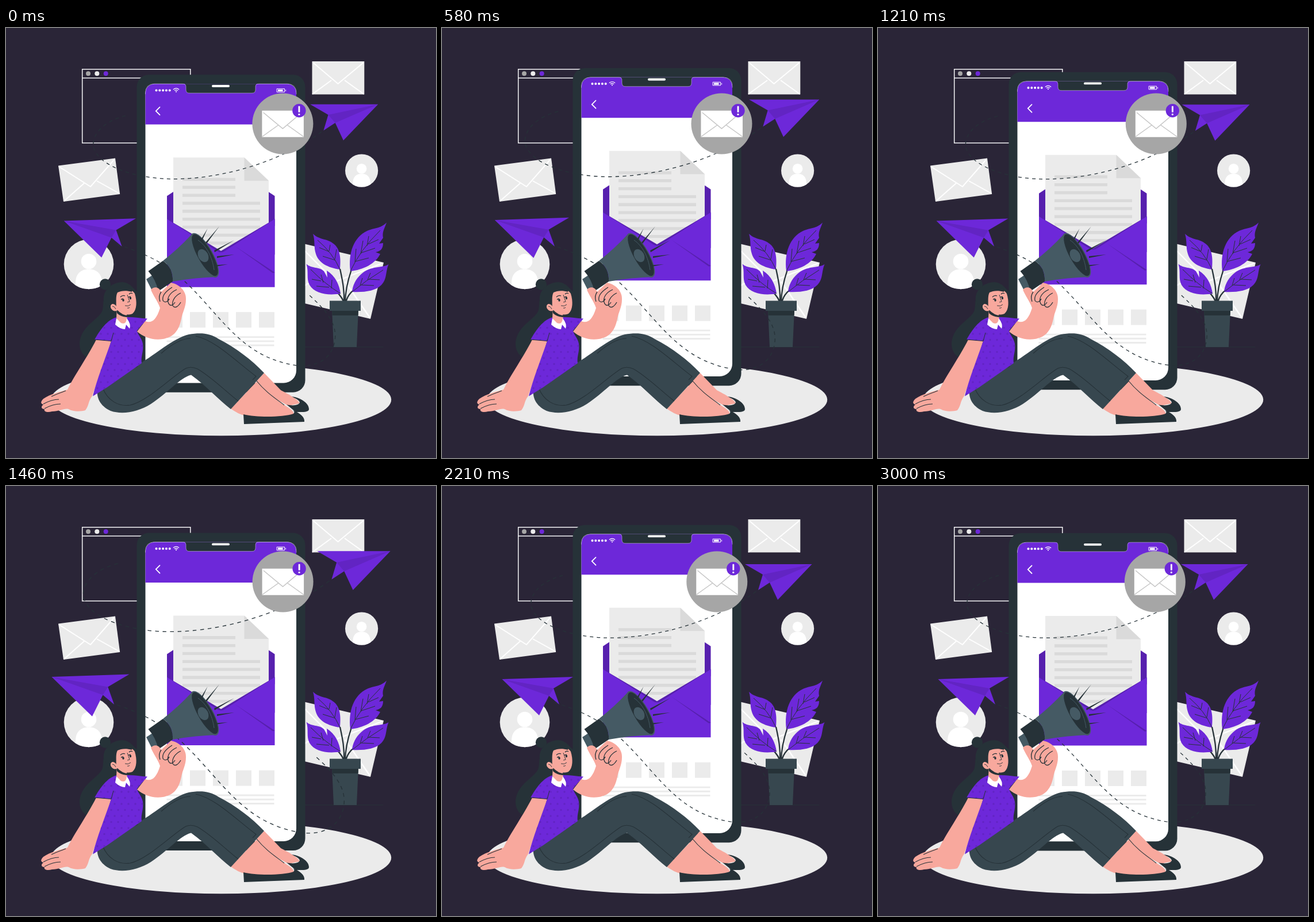
Recreate the animation shown at these times as an HTML page with a canvas. Size 748 by 748 pixels, loop 3.04 s.

```html
<!DOCTYPE html>
<html lang="en">
<head>
<meta charset="utf-8">
<title>Mail notifications</title>
<style>
html, body { margin: 0; width: 100%; height: 100%; overflow: hidden; background: #2a2537; }
canvas { display: block; width: 748px; height: 748px; }
</style>
</head>
<body>
<canvas id="stage" width="748" height="748"></canvas>
<script>
const ctx = document.getElementById('stage').getContext('2d');
const BG = '#2a2537', INK = '#263238', SLATE = '#37474f', STEEL = '#455a64';
const PURPLE = '#6d28d9', MID = '#6224c3', DEEP = '#5720ae', PALE = '#ebebeb', GREY = '#a6a6a6';
const SKIN = '#f8a89d', WHITE = '#fff';
const LOOP = 3040, CYCLE = 3000, FRAMES = 73, STEP = 1000 / 24, PX = 748 / 500;

const paths = new Map();
function path(d) {
  if (!paths.has(d)) paths.set(d, new Path2D(d));
  return paths.get(d);
}
function fill(color, d) { ctx.fillStyle = color; ctx.fill(path(d)); }
function line(color, width, d) {
  ctx.strokeStyle = color;
  ctx.lineWidth = width;
  ctx.stroke(path(d));
}
function rect(color, x, y, w, h, r = 0) {
  ctx.fillStyle = color;
  ctx.beginPath();
  ctx.roundRect(x, y, w, h, r);
  ctx.fill();
}
function oval(color, x, y, rx, ry = rx, turn = 0) {
  ctx.fillStyle = color;
  ctx.beginPath();
  ctx.ellipse(x, y, rx, ry, turn, 0, Math.PI * 2);
  ctx.fill();
}
function group(draw) { ctx.save(); draw(); ctx.restore(); }

// Linear keyframes: [[position, value], ...]
function track(keys, p) {
  const i = Math.max(1, keys.findIndex(k => k[0] >= p));
  const [a, u] = keys[i - 1], [b, v] = keys[i];
  return u + (v - u) * (p - a) / (b - a);
}
const FLOAT = [[0, 0], [.5, -10], [1, 0]];
const SHAKE = [[0, 0], [.1, -1], [.2, 2], [.3, -4], [.4, 4], [.5, -4], [.6, 4], [.7, -4], [.8, 2], [.9, -1], [1, 0]];
const BEAT = [[0, 1], [.1, 1.1], [.3, 1], [.4, 1], [.5, 1.1], [.6, 1], [1, 1]];

function browser() {
  line('#f4f4f6', 1.5, 'M132.7 71.8H320.8V200H132.7ZM132.7 87H320.8');
  oval(GREY, 143, 79.3, 4);
  oval(PALE, 158.3, 79.3, 4);
  oval(PURPLE, 173.7, 79.3, 4);
}
function avatar(x, y, s) {
  group(() => {
    ctx.translate(x, y);
    ctx.scale(s, s);
    oval(PALE, 0, 0, 43.3);
    ctx.clip();
    oval(WHITE, 0, -5, 13.3);
    fill(WHITE, 'M-23 50V32C-23 17-14 8.500 0 8.500S23 17 23 32V50Z');
  });
}
function letters() {
  rect(PALE, 532.5, 58, 90.8, 57.6);
  line(WHITE, 2, 'M534 60L577.500 97 622 60M533 115L566 91M589 91L622.500 115');
  fill(PALE, 'M91 239.500L190 226.500 198.200 289 100 302Z');
  line(WHITE, 2, 'M92 241L147 276 189 228M101 301L136 270M158 266L197.500 288');
  fill(PALE, 'M504 372L657 408 634 506 481 470Z');
  line(WHITE, 2.4, 'M506 374L573 441 655 409M483 469L549 431M590 441L633 504');
}

function phone(dy) {
  ctx.translate(0, dy);
  rect(INK, 227.5, 82, 293, 552.5, 21);
  group(() => {
    ctx.beginPath();
    ctx.roundRect(242.5, 98, 262.5, 520.3, [16, 16, 22, 22]);
    ctx.clip();
    rect(WHITE, 242, 97, 264, 522);
    rect(PURPLE, 242, 97, 264, 71.5);
    fill(INK, 'M306 97C312 97 313 99 313 104V108Q313 114 319 114H428Q434 114 434 108V104C434 99 435 97 441 97Z');
  });
  line('rgba(255,255,255,.5)', .8, 'M242.500 116V114Q242.500 98 258.500 98H306C312 98 313 100 313 104V108Q313 114 319 114H428Q434 114 434 108V104C434 100 435 98 441 98H489Q505 98 505 114V116');
  rect(WHITE, 358, 99.9, 31, 3.8, 1.9);
  for (let i = 0; i < 5; i++) oval(WHITE, 261.5 + i * 5.8, 109.3, 2);
  ctx.lineCap = 'round';
  line(WHITE, 1.2, 'M291.300 107.600Q296 104 300.700 107.600M293.300 109.700Q296 107.700 298.700 109.700');
  oval(WHITE, 296, 111.6, 1.1);
  line(WHITE, 1, 'M471.500 106.500H484.500V112.200H471.500ZM486.500 108.500V110.500');
  rect(WHITE, 473, 107.8, 8.5, 3.2);
  line(WHITE, 1.8, 'M267.500 138.500L260.800 145.200 267.500 152');
  ctx.lineCap = 'butt';

  fill(DEEP, 'M280 293L374 231 467.500 293V395H280Z');
  const sheet = 'M291 226H414.500L457 266.500V341L374 391 291 341Z';
  fill(PALE, sheet);
  group(() => {
    ctx.clip(path(sheet));
    for (let i = 0; i < 9; i++) rect('#dadada', 307, 261.5 + i * 13.85, i < 3 ? 92 : 135, 5.3);
  });
  fill('#dadada', 'M414.500 226L457 266.500H414.500Z');
  fill(DEEP, 'M280 333L374 388.500 467.500 333V345L374 398 280 345Z');
  fill(PURPLE, 'M280 333L366 388Q374 394 382 388L467.500 333V451.500H280Z');
  fill(DEEP, 'M398 380L467.500 426 464 427ZM350 380L280 426 283 427Z');
  for (let i = 0; i < 5; i++) rect(PALE, 280 + i * 40, 495, 27, 27);
  for (let i = 0; i < 3; i++) rect(PALE, 279.5, 537 + i * 7.2, 187, 2.9);
}

function plant() {
  line(INK, 1, 'M520 555H656');
  line(INK, 2.3, 'M588 478C589 455 585 438 581 419M590 478C590 455 596 435 601 420M588 478C584 467 578 460 565 452M591 478C594 464 602 456 619 446');
  fill(PURPLE, 'M599 423C595 391 605 364 628 353C641 347 650 350 662 338.500C658 350 654 355 656 365L649 375 656 374C656 385 651 388 643 390L651 393C643 410 621 421 599 423Z');
  fill(PURPLE, 'M534 358C546 370 560 365 573 378C583 389 582 406 581 420C560 417 544 409 539 393C535 381 538 370 534 358Z');
  fill(PURPLE, 'M522.500 410.500C532 419 545 415 553 423L559 434 558 422C573 431 580 447 582 462C560 466 537 462 528 447C522 436 527 424 522.500 410.500Z');
  fill(PURPLE, 'M665.500 411C655 418 634 413 618 428C608 437 603 448 602 459C622 460 642 458 653 447C663 437 660 424 665.500 411Z');
  line(INK, 1, 'M599 423Q616 386 651 352M607 407L609 384M617 393L621 370M628 379L631 362M608 406L631 400M618 391L642 383M630 376L648 368');
  line(INK, 1, 'M581 420Q568 391 542 369M572 402L575 385M562 388L564 377M573 404L551 397M562 389L545 382');
  line(INK, 1, 'M582 462Q557 447 530 420M566 453L567 438M552 443L548 429M562 451L540 449M548 440L532 437');
  line(INK, 1, 'M602 459Q626 439 656 421M616 448L620 435M629 438L634 426M618 447L640 448M631 437L650 438');
  fill(SLATE, 'M567 490H613L610 555H570Z');
  fill(INK, 'M567 491H613L612.500 500H567.500Z');
  rect(SLATE, 563, 474.5, 54, 17.5);
}

function flight(s) {
  ctx.translate(374, 380);
  ctx.scale(s, s);
  ctx.translate(-374, -380);
  ctx.setLineDash([6, 6]);
  line(INK, 1.25, 'M556 176C528 198 508 209 480 222C410 254 336 266 281 264C229 262 164 244 155 209C152 185 177 163 213 155');
  line(INK, 1.25, 'M197 377C270 400 300 425 342 471C390 524 425 572 502 584C538 589 568 572 570 535C571 508 550 486 526 464');
  ctx.setLineDash([]);
  fill(PURPLE, 'M527 136H643.500L584 198 570 168 550 181 558 154Z');
  fill(MID, 'M558 154L643.500 136 570 168Z');
  fill(PURPLE, 'M104.500 336L228 332 194 352 204 380 186 365 169 399Z');
  fill(MID, 'M104.500 336L194 352 186 365Z');
}

function badge(dx) {
  ctx.translate(dx, 0);
  oval(GREY, 481.8, 166.5, 53);
  rect(WHITE, 445.8, 143.7, 72.5, 46);
  line('#c4c4c4', 1.4, 'M448 147L481.800 175 515 147M446 189L474 169M490 169L518 189');
  oval(PURPLE, 510.3, 143.8, 11.7);
  rect(WHITE, 508.9, 135.8, 2.9, 11, 1);
  oval(WHITE, 510.3, 150.3, 1.6);
}

function legs() {
  fill(SKIN, 'M449 600L436 614C448 632 473 649 492 657L511 653C508 645 487 635 478 630Z');
  fill(INK, 'M497 641C512 643 527 652 527 663C527 669 514 668 504 668L488 655C500 658 510 656 511 651C509 646 502 644 497 641Z');
  fill(SKIN, 'M438 613L391 662C400 669 408 672 414 674C440 679 480 680 501 672C500 664 490 660 483 655C468 644 451 628 438 613Z');
  line(INK, 1.1, 'M436 614C452 634 470 645 484 656');
  fill(INK, 'M413 672C437 678 482 677 500 671C502 669 502 667 499 665C512 670 520 677 519 685L414 689Z');
  fill(SLATE, 'M234 583C260 568 290 540 318 533C337 530 354 530 370 541C400 556 428 578 449 600L391 663C370 647 348 622 322 603.500C303 608 280 636 252 654C230 668 202 673 182 666C163 657 157 643 159 626Z');
  line(INK, 1.1, 'M168 626C177 648 195 659 216 656C246 650 291 604 313 592Q322 588 333 593C356 606 380 630 404 649');
  line(INK, 1.1, 'M330 536C364 543 399 579 435 606L429 612M216 597C222 588 230 592 229 586M270 566C287 551 306 540 321 540');
}
function torso() {
  fill(SKIN, 'M157 542C142 572 119 604 107 629C96 632 76 637 65 645C59 651 61 654 65 655C59 660 63 663 67 663C65 668 73 669 80 667C93 667 101 661 109 663C117 668 131 667 138 665C145 656 142 651 150 640C159 613 176 572 183 544Z');
  line(INK, 1.1, 'M65 654C76 648 84 646 92 646M67 662C78 656 86 654 95 654M104 631C96 634 87 637 79 641');
  const shirt = 'M193 503C176 507 163 526 154 542L183 544.500C172 577 158 611 151 640.500L176 625 236 583C234 571 240 563 238 549C236 539 230 535 228 527L246 505.500C235 505 224 503 214 503Z';
  fill(PURPLE, shirt);
  group(() => {
    ctx.clip(path(shirt));
    for (let r = 0; r < 14; r++)
      for (let c = 0; c < 10; c++) oval(MID, 153 + c * 12 + r % 2 * 6, 511 + r * 10.5, 1.7);
  });
  line(INK, 1, 'M154 542L183 544.500 187 530M228 527L238 515');
}
function head() {
  fill(INK, 'M183 452C166 462 171 477 168 490C164 507 132 515 128 547C127 560 134 570 141 573L157 542C169 518 181 506 195 504L240 505V470L215 446Z');
}
function face() {
  fill(SKIN, 'M193 486L192 505Q201 519 211 513L210 495Z');
  fill(INK, 'M193 490Q202 500 213 500L210 503Q199 502 193 496Z');
  fill(WHITE, 'M192 505L190 516Q199 524 207 524L209 516L215 523Q218 515 210 505Q209 517 200 513Z');
  fill(SKIN, 'M190 456C200 451 219 453 224 462C228 475 228 490 220 497C207 502 196 494 192 487Z');
  oval(INK, 172.5, 446, 9.7);
  fill(INK, 'M170 474C168 456 184 442.500 203 442C214 443 220 450 219 459C209 456 200 457 194 460C190 467 193 477 190 486L180 492Z');
  fill(SKIN, 'M192 484C187 477 181 480 182 486C184 492 190 494 194 491Z');
  line(INK, .9, 'M185 484Q189 484 191 489');
  oval(INK, 204, 473.5, 1.7, 2.2);
  oval(INK, 216.5, 470, 1.6, 2.2);
  line(INK, 1.3, 'M199 468Q203 464 207 466M214 463Q217 460 220 462M200 472L204 471M213 468L217 467.500');
  line(INK, .9, 'M211 464L215 476 211 477M207 483Q213 485 217 481M211 487Q213 488 215 486');
}
function megaphone() {
  fill(STEEL, 'M244 437L256 429 270 451 255 458.500Z');
  fill(INK, 'M247.500 423L273 405C285 413 291 425 290 441L265 458Q261 438 247.500 423Z');
  fill(STEEL, 'M273 405Q300 384 324 358L367 433Q330 434 290 441C291 425 285 413 273 405Z');
  oval(STEEL, 345.6, 395.3, 43.5, 14.5, 1.06);
  oval(INK, 346, 395, 41, 12.5, 1.06);
  group(() => {
    ctx.clip();
    oval(STEEL, 343, 396, 12, 8.5, 1.06);
  });
  line(STEEL, 1, 'M334 369C348 378 359 398 362 421');
  fill(INK, 'M350.500 349L341 370 339 368ZM371 345L349 375 347 373ZM397 369L363 390 362 387ZM397 394L367 400 367 397ZM386 411L365 415 365 412.500Z');
}
function arm() {
  fill(SKIN, 'M242 510C252 514 261 510 268 487C264 475 255 464 252 455C257 450 265 449 270 459L287 443C302 446 314 458 313 472C313 486 307 494 305 506C300 530 289 538 273 541C256 544 240 538 228 528Z');
  line(INK, 1.3, 'M289 451C278 458 271 466 273 474C276 479 282 476 284 471M297 455C286 460 280 468 282 477C285 486 291 482 294 477M304 461C295 465 288 474 290 483C294 489 300 484 304 477M270 459C267 463 265 468 268 476');
}

function draw(now) {
  const frame = Math.min(FRAMES - 1, Math.floor((now % LOOP + 5) / STEP));
  const beat = (frame + 1) / FRAMES;
  const half = beat * 2 % 1;
  rect(BG, 0, 0, 748, 748);
  browser();
  letters();
  avatar(144, 411, 1);
  avatar(618.6, 248, .66);
  oval(PALE, 374.2, 646.5, 296, 62.7);
  group(() => phone(track(FLOAT, half) * PX));
  plant();
  group(() => flight(track(BEAT, beat)));
  group(() => badge(track(SHAKE, half) * PX));
  head();
  legs();
  torso();
  face();
  megaphone();
  arm();
}

let start;
function tick(now) {
  start ??= now;
  draw(now - start);
  requestAnimationFrame(tick);
}
draw(0);
requestAnimationFrame(tick);
</script>
</body>
</html>
```
